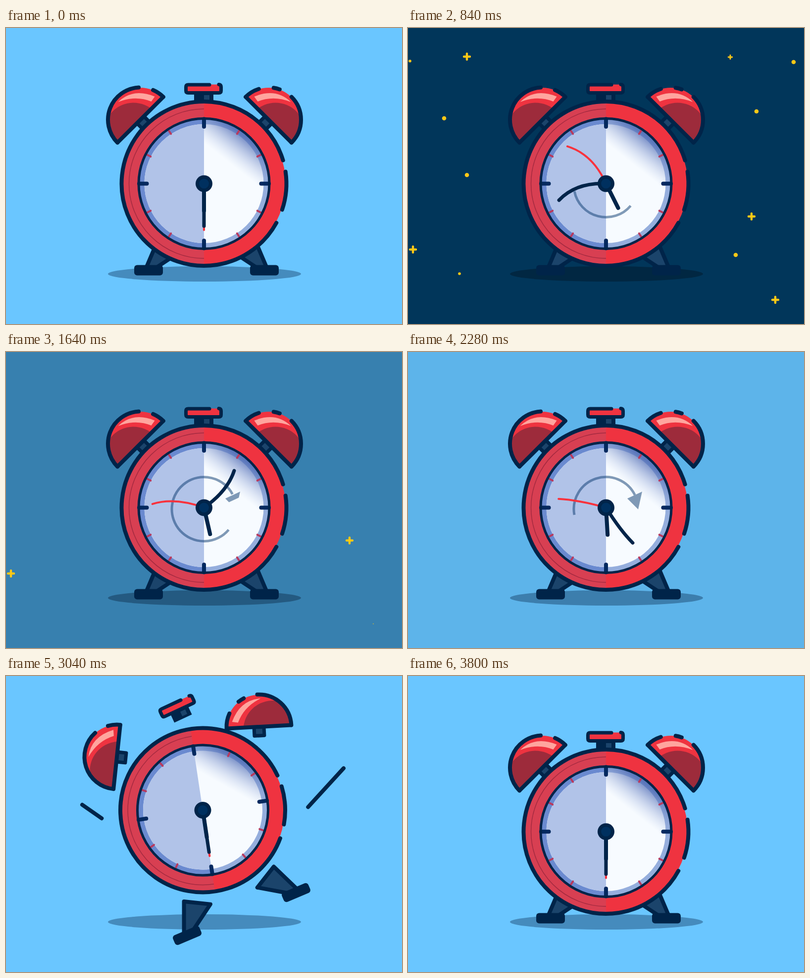
Animation of 800 by 600 pixels, one loop 4760 ms. Source, as an HTML page:

```html
<!DOCTYPE html>
<html lang="en">
<head>
<meta charset="utf-8">
<title>Alarm clock</title>
<style>
  html, body { margin: 0; width: 100%; height: 100%; overflow: hidden; }
  svg { display: block; width: 800px; height: 600px; }
  .line { fill: none; stroke: #002449; stroke-width: 8; stroke-linecap: round; stroke-linejoin: round; }
  .thin { stroke-width: 7; }
  .navy { fill: #002449; }
  .steel { fill: #1b446b; }
  .red { fill: #ef3340; }
</style>
</head>
<body>
<svg viewBox="0 0 800 600">
  <defs>
    <linearGradient id="shade" gradientUnits="userSpaceOnUse" x1="103" y1="-118" x2="46" y2="-46">
      <stop offset="0" stop-color="#3c59a8"/>
      <stop offset=".35" stop-color="#4a67b2" stop-opacity=".75"/>
      <stop offset="1" stop-color="#b1c3e8" stop-opacity="0"/>
    </linearGradient>
    <clipPath id="dome"><path d="M46-46 A65 65 0 0 0-46 46Z"/></clipPath>
    <g id="bell">
      <rect class="line thin steel" x="-10" y="0" width="20" height="18" transform="rotate(-45)"/>
      <g clip-path="url(#dome)">
        <circle class="red" r="66"/>
        <circle cx="-14" cy="25" r="59.5" fill="#9d2b3b"/>
        <path fill="#ffa59e" d="M-45-36 Q-15-65 29-47 L22-37 Q-10-50-45-36Z"/>
      </g>
      <path class="line" d="M46-46 L-46 46"/>
    </g>
    <g id="foot">
      <path class="line steel" d="M-4-7 L21-66 L68-40 L15-5Z"/>
      <rect class="navy" x="-29" y="-10.5" width="58" height="21" rx="6"/>
    </g>
  </defs>

  <rect id="sky" width="800" height="600"/>
  <g id="stars" fill="#fdc816"></g>
  <ellipse id="shadow" cx="401" cy="498.5" rx="195" ry="15.5"/>
  <g id="footL"><use href="#foot"/></g>
  <g id="footR"><use href="#foot" transform="scale(-1 1)"/></g>
  <g id="bellL"><use href="#bell"/></g>
  <g id="bellR"><g id="mirrored" transform="scale(-1 1)"><use href="#bell"/></g></g>
  <g id="button">
    <rect class="navy" x="-19" y="8" width="39" height="19"/>
    <rect class="steel" x="1" y="12" width="11" height="10"/>
    <rect class="red" x="-35" y="-9.5" width="70" height="18" rx="4"/>
    <path class="line thin" d="M12-9 H-31 Q-35.5-9-35.5-4.5 V3 Q-35.5 7.5-31 7.5 H31 Q35.5 7.5 35.5 3 V-4.5 Q35.5-9 31-9.5"/>
  </g>

  <g id="body">
    <circle class="red" r="165"/>
    <path fill="#d83f52" d="M0-165 A165 165 0 0 0 0 165Z"/>
    <path fill="none" stroke="#a32a40" stroke-width="1.5" d="M0-151.5 A151.5 151.5 0 0 0 0 151.5"/>
    <circle r="131" fill="#95aedd"/>
    <path fill="#6a8ad0" d="M0-131 A131 131 0 0 0 0 131Z"/>
    <circle r="120.5" fill="#f7fbff"/>
    <path fill="#b1c3e8" d="M0-120.5 A120.5 120.5 0 0 0 0 120.5Z"/>
    <path fill="url(#shade)" d="M0-131 A131 131 0 0 1 0 131Z"/>
    <g id="ticks" stroke-linecap="round"></g>
    <circle r="132" class="line" style="stroke-width:5"/>
    <g id="rim"></g>
    <g opacity=".5">
      <path id="arc" fill="none" stroke="#0a3a70" stroke-width="5"/>
      <path id="head" fill="#0a3a70"/>
    </g>
    <path id="second" class="line" style="stroke:#f9323c;stroke-width:4"/>
    <path id="hour" class="line"/>
    <path id="minute" class="line thin"/>
    <circle class="navy" r="17"/>
    <circle r="10" fill="#00305f"/>
  </g>
  <g id="dashes"></g>
</svg>
<script>
const LOOP = 4760, TURN = 2880;
const $ = id => document.getElementById(id);
const clamp = x => Math.max(0, Math.min(1, x));
const span = (t, a, b) => clamp((t - a) / (b - a));
const ease = (t, a, b) => (1 - Math.cos(Math.PI * span(t, a, b))) / 2;
const pulse = (t, a, b, c, d) => ease(t, a, b) - ease(t, c, d);
const mix = (a, b, u) => a + (b - a) * u;
const mixAll = (p, q, u) => p.map((v, i) => mix(v, q[i], u));
const polar = (r, deg) => [r * Math.cos(deg * Math.PI / 180), r * Math.sin(deg * Math.PI / 180)];

function add(parent, tag, attrs) {
  const el = document.createElementNS('http://www.w3.org/2000/svg', tag);
  for (const k in attrs) el.setAttribute(k, attrs[k]);
  return parent.appendChild(el);
}

function arcPath(r, a, b, cy = 0) {
  const [x, y] = polar(r, a), [u, v] = polar(r, b);
  return `M${x} ${y + cy} A${r} ${r} 0 ${b - a > 180 ? 1 : 0} 1 ${u} ${v + cy}`;
}

// Broken outlines, as angle ranges
const outline = (id, r, ...arcs) =>
  arcs.forEach(([a, b]) => add($(id), 'path', { class: 'line', d: arcPath(r, a, b) }));
outline('rim', 166.5, [28.5, 343.5], [-8.4, 18.5]);
outline('bellL', 65.5, [-225, -93], [-67, -45]);
outline('mirrored', 65.5, [-225, -135], [-110, -99], [-72.5, -45]);

function tickMark(deg, from, to, stroke, width) {
  add($('ticks'), 'path', { d: `M${polar(from, deg)}L${polar(to, deg)}`, stroke, 'stroke-width': width });
}
for (let a = 0; a < 360; a += 90) {
  tickMark(a, 131, 115.5, '#04295f', 8);
  for (const off of [27, 56.5]) tickMark(a % 180 ? a + 90 - off : a + off, 129, 121, '#b83a5e', 4);
}

// x, y, dot radius (none for a plus), in order of vanishing
const stars = [
  [335, 39, 2.8], [358, 585, 2.8], [724, 309, 2.8], [651, 59], [704, 169, 4.3],
  [119, 298, 4.3], [779, 69, 4.3], [73, 183, 4.3], [4, 67, 2.8], [104, 498, 2.8],
  [119, 58], [662, 460, 4.3], [742, 551], [694, 382], [10, 449]
].map(([x, y, r]) => ({
  x, y,
  el: r ? add($('stars'), 'circle', { r })
    : add($('stars'), 'path', { d: 'M-6 0H6M0-6V6', stroke: '#fdc816', 'stroke-width': 4.4, 'stroke-linecap': 'round' })
}));

// Rest position, then shift and tilt when thrown to the left
const parts = {
  bellL: { at: [271.5, 186], shift: [-47.5, -22], tilt: -39 },
  bellR: { at: [530.5, 186], shift: [-19.5, -83], tilt: -48 },
  button: { at: [399, 124], shift: [-53, -62], tilt: -25 },
  body: { at: [400, 315.5], shift: [-2.5, -43.5], tilt: -8.5 },
  footL: { at: [288, 491], shift: [78, 35], tilt: -23 },
  footR: { at: [522, 491], shift: [64, -52], tilt: -23 }
};
const twin = id => id.replace(/[LR]$/, c => c === 'L' ? 'R' : 'L');

// One pair of dashes per throw, the second mirrored and wider
const dashes = [];
for (const [start, reach] of [[2880, 1], [3260, -1.17]])
  for (const ends of [[[209, 267], [282, 187]], [[-206, 289], [-246, 261]]]) {
    const [from, to] = ends.map(([x, y]) => [400 + x * reach, y]);
    dashes.push({ el: add($('dashes'), 'path', { class: 'line' }), from, to, start });
  }

function drawSky(t, p) {
  const dusk = ease(t, 0, 320);
  const paint = (id, day, night) => {
    const rgb = mixAll(day, mixAll(night, day, p), dusk).map(v => Math.max(0, v));
    $(id).setAttribute('fill', `rgb(${rgb})`);
  };
  paint('sky', [106, 198, 255], [-25, 19, 50]);
  paint('shadow', [69, 139, 189], [-15, 14, 36]);

  stars.forEach(({ el, x, y }, i) => {
    const born = 80 + i * 7 % 9 * 14, gone = 660 + i * 84;
    const k = pulse(t, born, born + 120, gone - 120, gone);
    el.setAttribute('transform', `translate(${x} ${y}) scale(${k})`);
    el.setAttribute('visibility', k > .01 ? 'visible' : 'hidden');
  });
}

function hand(id, len, deg, bend) {
  $(id).setAttribute('d', `M0 0 Q${polar(len * .6, deg - 90 + bend)} ${polar(len, deg - 90)}`);
}

function drawHands(t, p) {
  const x = span(t, 0, TURN), sway = 100 * x * (1 - x) ** 2;
  hand('second', 94 + sway, 180 + 7 * 360 * p, sway * 1.5);
  hand('minute', 86 + sway, 180 + 360 * p, sway * 1.5);
  hand('hour', 55, mix(180, mix(147, 180, p), ease(t, 0, 280)), 0);
}

function drawArrow(t) {
  const end = ease(t, 90, 1720), start = ease(t, 1800, 2840);
  $('arc').setAttribute('d', end > start ? arcPath(65, mix(40, 334, start), mix(40, 334, end), 3) : '');
  const a = [43, -18.5], b = [73, -32.5], tip = [65, 3.5];
  const u = span(t, 2700, 2840), v = span(t, 1560, 1800);
  const pts = [mixAll(a, tip, u), mixAll(b, tip, u), mixAll(b, tip, v), mixAll(a, tip, v)];
  $('head').setAttribute('d', v > u ? `M${pts.join('L')}Z` : '');
}

function drawThrow(t) {
  const left = pulse(t, 2820, 3000, 3080, 3320);
  const right = .9 * pulse(t, 3080, 3320, 3420, 3700);
  for (const id in parts) {
    const { at, shift, tilt } = parts[id], other = parts[twin(id)];
    const x = at[0] + left * shift[0] - right * other.shift[0];
    const y = at[1] + left * shift[1] + right * (other.shift[1] - 16);
    $(id).setAttribute('transform', `translate(${x} ${y}) rotate(${left * tilt - right * other.tilt})`);
  }
  for (const { el, from, to, start } of dashes) {
    const u = ease(t, start + 150, start + 280), v = ease(t, start, start + 140);
    el.setAttribute('d', v > u ? `M${mixAll(from, to, u)}L${mixAll(from, to, v)}` : '');
  }
}

function render(t) {
  const p = ease(t, 0, TURN);
  drawSky(t, p);
  drawHands(t, p);
  drawArrow(t);
  drawThrow(t);
}

const begin = performance.now();
function tick() {
  render((performance.now() - begin) % LOOP);
  requestAnimationFrame(tick);
}
tick();
</script>
</body>
</html>
```
